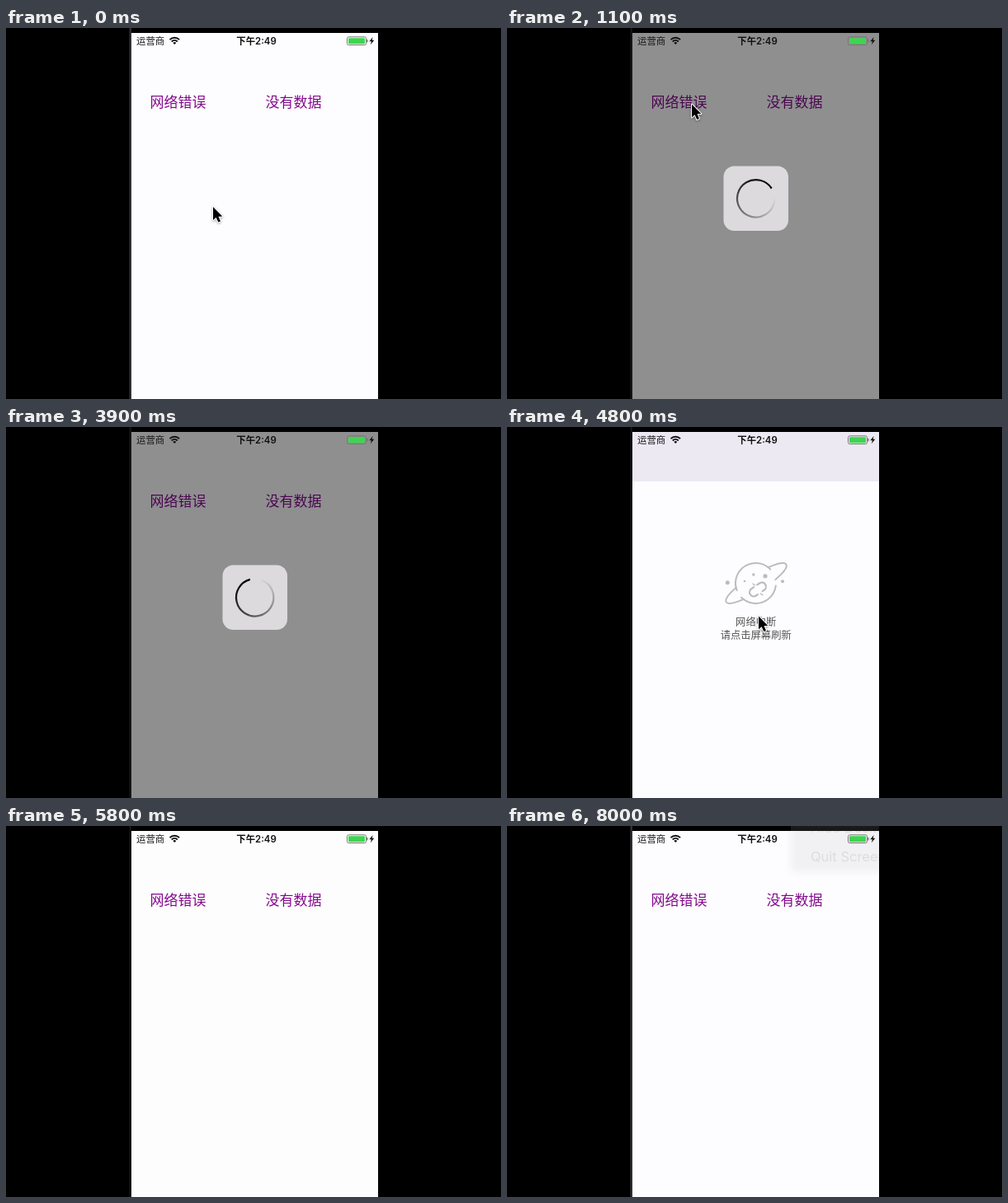
Animation of 600x450 px, one loop 8100 ms. Source, as an HTML page with a canvas:

```html
<!DOCTYPE html>
<html lang="zh">
<head>
<meta charset="utf-8">
<title>Loading and empty state</title>
<style>
html, body { margin: 0; width: 100%; height: 100%; overflow: hidden; background: #000; }
canvas { display: block; width: 600px; height: 450px; }
</style>
</head>
<body>
<canvas id="stage" width="600" height="450"></canvas>
<script>
const ctx = document.getElementById('stage').getContext('2d');
const LOOP = 8100, TICK = 100;
const CJK = '"Noto Sans CJK SC", "Noto Sans CJK", sans-serif';
const PHONE = { x: 152, y: 6, w: 299, h: 444 };

const ease = p => p * p * (3 - 2 * p);
const progress = (t, from, to) => Math.min(1, Math.max(0, (t - from) / (to - from)));

function rect(x, y, w, h, color) {
  ctx.fillStyle = color;
  ctx.fillRect(x, y, w, h);
}

function roundRect(x, y, w, h, r) {
  ctx.beginPath();
  ctx.roundRect(x, y, w, h, r);
}

function text(str, x, y, font, color, align = 'left') {
  ctx.font = font;
  ctx.fillStyle = color;
  ctx.textAlign = align;
  ctx.textBaseline = 'alphabetic';
  ctx.fillText(str, x, y);
}

function dot(x, y, r) {
  ctx.beginPath();
  ctx.arc(x, y, r, 0, Math.PI * 2);
  ctx.fill();
}

function polygon(points) {
  ctx.beginPath();
  points.forEach(([x, y]) => ctx.lineTo(x, y));
  ctx.closePath();
}

function drawWifi(x, y) {
  ctx.strokeStyle = ctx.fillStyle = '#111';
  ctx.lineWidth = 1.9;
  for (const r of [5, 8.2]) {
    ctx.beginPath();
    ctx.arc(x, y, r, -Math.PI * 0.75, -Math.PI * 0.25);
    ctx.stroke();
  }
  ctx.beginPath();
  ctx.moveTo(x, y);
  ctx.arc(x, y, 2.8, -Math.PI * 0.75, -Math.PI * 0.25);
  ctx.fill();
}

function drawBattery() {
  ctx.strokeStyle = '#777';
  ctx.lineWidth = 1;
  roundRect(413.5, 10.8, 23, 9.8, 2);
  ctx.stroke();
  ctx.fillStyle = '#3fd450';
  roundRect(415, 12.2, 20, 7, 1);
  ctx.fill();
  rect(437.2, 14, 1.4, 3.4, '#777');
  ctx.fillStyle = '#111';
  polygon([[444.6, 11], [440.3, 16.2], [442.9, 16.2], [441.8, 20.3], [446.3, 14.8], [443.6, 14.8]]);
  ctx.fill();
}

function drawStatusBar() {
  text('运营商', 158, 20, '500 11.4px ' + CJK, '#161616');
  drawWifi(204.3, 20);
  text('下午2:49', 303.5, 20, '600 11.4px Inter, ' + CJK, '#111', 'center');
  drawBattery();
}

function drawHome(bg) {
  rect(PHONE.x, PHONE.y, PHONE.w, PHONE.h, bg);
  const font = '17px ' + CJK;
  text('网络错误', 174.5, 96, font, '#820a8c');
  text('没有数据', 314.5, 96, font, '#820a8c');
}

function drawLoader(t) {
  rect(PHONE.x, PHONE.y, PHONE.w, PHONE.h, 'rgba(0,0,0,0.435)');
  ctx.fillStyle = '#dcdadd';
  roundRect(262.5, 167.5, 78.5, 78.5, 13);
  ctx.fill();

  // One clockwise turn per second, fading along the tail
  const head = (-32 + 0.36 * (t - 1100)) * Math.PI / 180;
  const fade = ctx.createConicGradient(head, 301.7, 206.8);
  fade.addColorStop(0, 'rgba(0,0,0,0)');
  fade.addColorStop(0.08, 'rgba(0,0,0,0)');
  fade.addColorStop(0.8, 'rgba(0,0,0,0.9)');
  fade.addColorStop(1, '#000');
  ctx.strokeStyle = fade;
  ctx.lineWidth = 2.2;
  ctx.beginPath();
  ctx.arc(301.7, 206.8, 22.7, head + 0.02, head + Math.PI * 2 - 0.01);
  ctx.stroke();
}

function drawPlanet() {
  const gray = '#bcbbbf';
  const cx = 301.5, cy = 189.5, r = 24.5;
  ctx.save();
  ctx.strokeStyle = ctx.fillStyle = gray;
  ctx.lineWidth = 2;
  ctx.lineCap = 'round';

  ctx.beginPath();
  ctx.arc(cx, cy, r, 0.12, 2.36);
  ctx.stroke();
  ctx.beginPath();
  ctx.arc(cx, cy, r, 2.78, 5.52);
  ctx.stroke();

  // Ring, only where it leaves the globe
  ctx.save();
  ctx.beginPath();
  ctx.rect(255, 155, 95, 70);
  ctx.arc(cx, cy, r - 1, 0, Math.PI * 2);
  ctx.clip('evenodd');
  ctx.beginPath();
  ctx.ellipse(302, 189.5, 43, 10, -0.56, 0, Math.PI * 2);
  ctx.stroke();
  ctx.restore();

  dot(267.3, 188.8, 2.5);
  dot(334, 187.3, 2);
  dot(298.8, 179, 1.7);
  dot(313, 180.8, 2.6);
  dot(288, 187, 1.3);

  // Broken chain link
  ctx.translate(304, 197);
  ctx.rotate(-0.6);
  ctx.lineWidth = 2.2;
  for (const side of [-1, 1]) {
    ctx.beginPath();
    ctx.moveTo(side * 2.5, -5);
    ctx.lineTo(side * 6, -5);
    ctx.arc(side * 6, 0, 5, -Math.PI / 2, Math.PI / 2, side < 0);
    ctx.lineTo(side * 3.5, 5);
    ctx.stroke();
  }
  ctx.lineWidth = 1.3;
  for (const side of [-1, 1]) {
    ctx.beginPath();
    ctx.moveTo(0, side * 6);
    ctx.lineTo(side, side * 9);
    ctx.stroke();
  }
  ctx.restore();
}

function drawErrorPage() {
  rect(PHONE.x, PHONE.y, PHONE.w, PHONE.h, '#fdfcfe');
  rect(PHONE.x, PHONE.y, PHONE.w, 60, '#ece9f3');
  drawPlanet();
  const font = '300 12.3px ' + CJK;
  text('网络中断', 301.7, 240.5, font, '#555', 'center');
  text('请点击屏幕刷新', 301.7, 257.3, font, '#555', 'center');
}

function drawMenu(alpha) {
  ctx.save();
  ctx.beginPath();
  ctx.rect(PHONE.x, 0, PHONE.w, 100);
  ctx.clip();
  ctx.globalAlpha = alpha;
  ctx.shadowColor = 'rgba(0,0,0,0.5)';
  ctx.shadowBlur = 10;
  ctx.shadowOffsetY = 3;
  rect(344, -20, 140, 73, '#f0eff2');
  ctx.shadowColor = 'transparent';
  const font = '16.5px Inter, sans-serif';
  text('Hide Desktop', 368, 8, font, '#333');
  text('Quit Screen', 368, 43, font, '#333');
  ctx.restore();
}

function cursorAt(t) {
  const glide = (from, to, p) => from.map((v, i) => v + (to[i] - v) * ease(p));
  if (t < 1800) return glide([251, 217], [224, 92.5], progress(t, 0, 900));
  if (t >= 4300 && t < 5000) return glide([373, 217.5], [305, 229.5], progress(t, 4400, 4800));
  if (t >= 5000 && t < 5500) return glide([305, 229.5], [455, 190], progress(t, 5000, 5500));
  return null;
}

function drawCursor([x, y]) {
  ctx.save();
  ctx.beginPath();
  ctx.rect(PHONE.x, PHONE.y, PHONE.w, PHONE.h);
  ctx.clip();
  ctx.translate(x, y);
  polygon([[0, 0], [0, 16], [3.6, 12.7], [6.3, 18.6], [9, 17.4], [6.5, 11.7], [11.3, 11.5]]);
  ctx.shadowColor = 'rgba(0,0,0,0.35)';
  ctx.shadowBlur = 3;
  ctx.shadowOffsetY = 1;
  ctx.lineWidth = 2;
  ctx.lineJoin = 'round';
  ctx.strokeStyle = '#fff';
  ctx.stroke();
  ctx.shadowColor = 'transparent';
  ctx.fillStyle = '#000';
  ctx.fill();
  ctx.restore();
}

function draw(t) {
  rect(0, 0, 600, 450, '#000');
  rect(149.5, 0, 2.5, 450, t < 200 || t >= 7000 ? '#302f31' : '#161517');

  if (t >= 4000 && t < 5000) {
    drawErrorPage();
  } else {
    drawHome(t >= 5000 && t < 7000 ? '#fefdfe' : '#fdfcfe');
    if (t >= 1000 && t < 4000) drawLoader(t);
  }
  if (t >= 7900) drawMenu(t < 8000 ? 0.4 : 0.1);
  drawStatusBar();

  const cursor = cursorAt(t);
  if (cursor) drawCursor(cursor);
}

const start = performance.now();
function frame() {
  const t = (performance.now() - start) % LOOP;
  draw(Math.floor(t / TICK) * TICK);
  requestAnimationFrame(frame);
}
frame();
</script>
</body>
</html>
```
